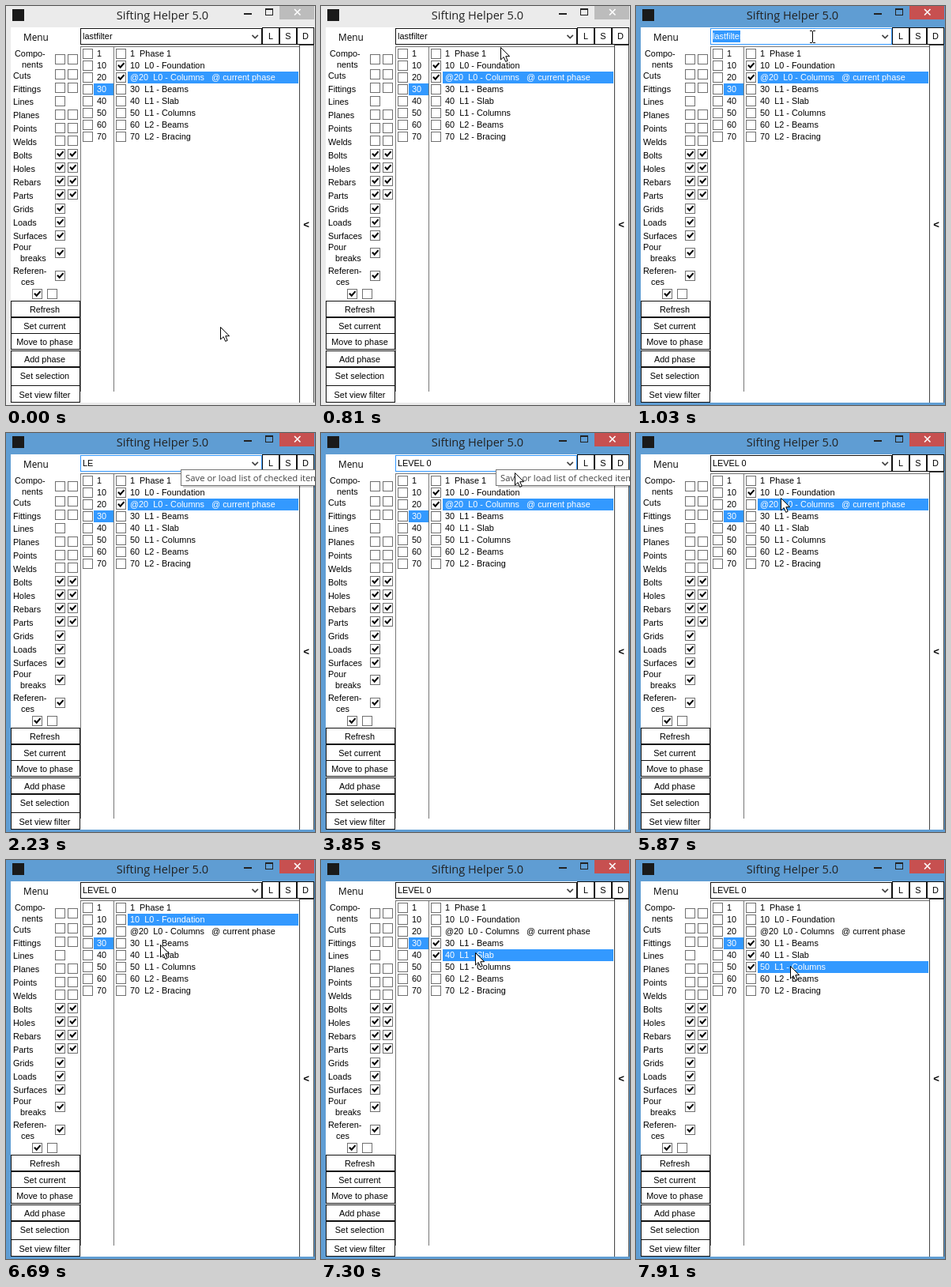
An HTML page for the animation above (8000 ms loop, 391 by 505 pixels).

```html
<!DOCTYPE html>
<html lang="en">
<head>
<meta charset="utf-8">
<title>Phase filter</title>
<style>
  html, body { margin: 0; width: 100%; height: 100%; overflow: hidden; }
  svg { display: block; width: 391px; height: 505px; }
  text { font: 10.9px "Liberation Sans", Arial, sans-serif; fill: #000; white-space: pre; }
  rect, .line { shape-rendering: crispEdges; }
  .line { fill: none; }
  .ui { font-family: "Open Sans", "Noto Sans", sans-serif; }
  .mid { text-anchor: middle; }
</style>
</head>
<body>
<svg id="stage" viewBox="0 0 391 505"></svg>
<script>
const stage = document.getElementById('stage');
const LOOP = 8000, BLUE = '#3399ff', FRAME = '#5f9dd3', IDLE = '#ebebeb';

function add(tag, attrs, parent = stage) {
  const el = document.createElementNS('http://www.w3.org/2000/svg', tag);
  for (const k in attrs) el.setAttribute(k, attrs[k]);
  return parent.appendChild(el);
}
const rect = (x, y, width, height, fill, parent) => add('rect', { x, y, width, height, fill }, parent);
const box = (x, y, w, h, stroke = '#111', fill = '#fff') =>
  add('rect', { x: x + .5, y: y + .5, width: w - 1, height: h - 1, fill, stroke });
const line = (d, stroke) => add('path', { d, class: 'line', stroke });
function text(str, x, y, attrs = {}, parent) {
  const el = add('text', { x, y, ...attrs }, parent);
  el.textContent = str;
  return el;
}
const show = (el, on) => el.setAttribute('visibility', on ? 'visible' : 'hidden');

// Returns the tick mark so that it can be toggled
function checkbox(x, cy, on) {
  box(x, cy - 6, 13, 13, '#707070');
  const tick = add('path', { d: `M${x + 3} ${cy - .3}l2.7 3 4.8-5.6`, fill: 'none', stroke: '#000', 'stroke-width': 2.1 });
  show(tick, on);
  return tick;
}

// Window frame
const frame = rect(0, 0, 391, 505, IDLE);
rect(8, 4, 15, 15, '#1a1a1a');
text('Sifting Helper 5.0', 198, 17, { class: 'ui mid', style: 'font-size:14.6px;fill:#222' });
rect(301, 9, 10, 2, '#222');
line('M328.5 3.5h9v8h-9zM328 4.5h10', '#222');
const close = rect(346, 0, 44, 17, '#bcbcbc');
add('path', { d: 'M365 4l7.5 7.5m0-7.5l-7.5 7.5', stroke: '#fff', 'stroke-width': 1.6 });
rect(6, 27, 384, 475, '#fff');
text('Menu', 22, 43.5, { class: 'ui', style: 'font-size:11.8px' });

// Top bar
const combo = box(94, 28, 230, 21);
const picked = rect(97, 31, 35, 15, BLUE);
const entry = text('', 97, 42);
add('path', { d: 'M311.5 36.8l3.7 3.7 3.7-3.7', fill: 'none', stroke: '#444', 'stroke-width': 1.7 });
[['L', 324], ['S', 346], ['D', 368]].forEach(([s, x]) => {
  box(x, 27, 22, 22);
  text(s, x + 11, 42, { class: 'mid' });
});
const pressed = add('rect', { x: 347.5, y: 28.5, width: 19, height: 19, fill: 'none', stroke: '#333' });

// Object types: label, baseline, box centre, ticked, number of boxes
const types = [
  ['Cuts', 92, 86, 0, 2], ['Fittings', 109, 103, 0, 2], ['Lines', 125, 120, 0, 1],
  ['Planes', 142, 137, 0, 2], ['Points', 159, 154, 0, 2], ['Welds', 176, 170, 0, 2],
  ['Bolts', 193, 187, 1, 2], ['Holes', 210, 204, 1, 2], ['Rebars', 227, 221, 1, 2],
  ['Parts', 244, 238, 1, 2], ['Grids', 261, 256, 1, 1], ['Loads', 278, 273, 1, 1],
  ['Surfaces', 295, 290, 1, 1], ['Pour', 309, 312, 1, 1], ['Referen-', 339, 341, 1, 1],
  ['', 0, 67, 0, 2]
];
types.forEach(([name, y, cy, on, count]) => {
  text(name, 9, y);
  for (let i = 0; i < count; i++) checkbox(62 + 16 * i, cy, on);
});
text('Compo-', 11, 64);
text('nents', 20, 78);
text('breaks', 18, 323);
text('ces', 19, 353);
checkbox(33, 364, 1);
checkbox(52, 364, 0);

// Left buttons
[['Refresh', 373, 21, 388], ['Set current', 394, 21, 409], ['Move to phase', 414, 21, 429],
 ['Add phase', 436, 21, 451], ['Set selection', 457, 24, 472], ['Set view filter', 480, 22, 496]]
  .forEach(([name, y, h, base]) => {
    box(6, y, 88, h);
    text(name, 49, base, { class: 'mid' });
  });

// Lists
line('M94.5 488V51.5H136M136.5 488V51.5H371', '#777');
line('M371.5 49V502M389.5 49V502M371 49.5H390', '#444');
text('<', 380, 281, { class: 'mid', style: 'font-size:13px;font-weight:bold' });

const phases = ['1  Phase 1', '10  L0 - Foundation', '@20  L0 - Columns   @ current phase',
  '30  L1 - Beams', '40  L1 - Slab', '50  L1 - Columns', '60  L2 - Beams', '70  L2 - Bracing'];
const marker = rect(154, 83, 216, 15, BLUE);
rect(111, 98, 25, 15, BLUE);
const rows = phases.map((name, i) => {
  const cy = 60 + 15 * i;
  checkbox(97, cy, 0);
  text(i ? 10 * i : 1, 115, cy + 4, i === 3 ? { style: 'fill:#fff' } : {});
  return { tick: checkbox(139, cy, 0), label: text(name, 157, cy + 4) };
});

// Tooltip and pointers
const tip = add('g', {});
rect(224, 48, 167, 21, 'rgba(0,0,0,.18)', tip);
add('rect', { x: 221.5, y: 46.5, width: 180, height: 20, fill: '#fff', stroke: '#767676' }, tip);
text('Save or load list of checked items', 227, 60.5, { class: 'ui', style: 'font-size:11.3px;fill:#444' }, tip);

const arrow = add('path', {
  d: 'M.5.5V16L4.2 12.6 6.7 18.4 9.2 17.3 6.8 11.7H11.6Z', fill: '#fff', stroke: '#000'
});
const beam = line('M220 31.5h3m1 0h3M223.5 32v14M220 46.5h3m1 0h3', '#000');

// Pointer tip: start time, x, y
const path = [
  [0, 271, 406], [200, 268, 380], [400, 255, 290], [610, 240, 150], [810, 227, 52],
  [3640, 232, 49], [3850, 245, 50], [4050, 282, 38], [4250, 328, 25], [4450, 351, 19],
  [4650, 357, 33], [4850, 355, 36], [5060, 330, 50], [5260, 255, 82], [5460, 195, 97],
  [5670, 184, 90], [5870, 183, 82], [6080, 184, 76], [6480, 188, 86], [6690, 195, 107],
  [7080, 195, 117], [7500, 195, 127], [7710, 195, 134]
];
const typing = [[0, 'lastfilter'], [2030, 'L'], [2230, 'LE'], [2430, 'LEV'], [2640, 'LEVE'],
  [2840, 'LEVEL '], [3240, 'LEVEL 0']];
// Each click toggles a row and selects it
const clicks = [[5670, 2], [6280, 1], [6890, 3], [7300, 4], [7910, 5]];

const at = (steps, t) => steps.filter(s => s[0] <= t).pop();

function draw(t) {
  const within = (a, b) => t >= a && t < b;
  frame.setAttribute('fill', t < 1030 ? IDLE : FRAME);
  close.setAttribute('fill', t < 1030 ? '#bcbcbc' : '#c75050');
  combo.setAttribute('stroke', within(1030, 4650) ? BLUE : '#111');

  const selected = within(1030, 2030);
  show(picked, selected);
  entry.textContent = at(typing, t)[1];
  entry.style.fill = selected ? '#fff' : '#000';
  show(pressed, within(4650, 5670));

  const checked = new Set([1, 2]);
  let current = 2;
  for (const [start, row] of clicks) {
    if (t < start) break;
    if (!checked.delete(row)) checked.add(row);
    current = row;
  }
  marker.setAttribute('y', 53 + 15 * current);
  rows.forEach((row, i) => {
    show(row.tick, checked.has(i));
    row.label.style.fill = i === current ? '#fff' : '#000';
  });

  show(tip, within(1420, 4050));
  tip.setAttribute('opacity', t < 1610 ? .5 : 1);
  const [, x, y] = at(path, t);
  arrow.setAttribute('transform', `translate(${x} ${y})`);
  show(arrow, !within(1030, 3640));
  show(beam, within(1030, 2030));
}

function tick() {
  draw(performance.now() % LOOP);
  requestAnimationFrame(tick);
}
tick();
</script>
</body>
</html>
```
